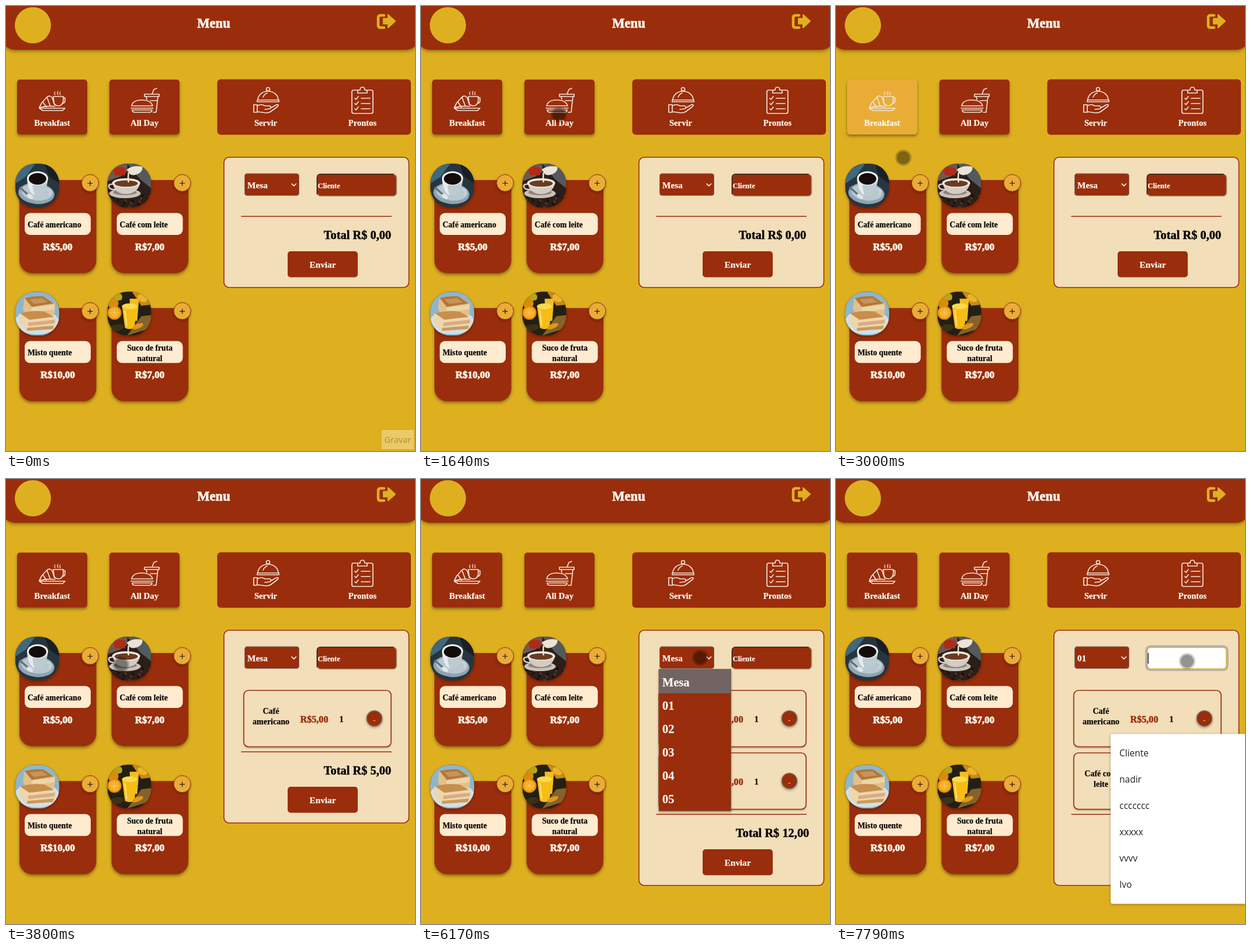
Write an HTML page with a canvas that moves like this. It is 700x762 px and loops after 7990 ms.

```html
<!DOCTYPE html>
<html lang="pt">
<head>
<meta charset="utf-8">
<title>Menu</title>
<style>
html, body { margin: 0; width: 100%; height: 100%; overflow: hidden; background: #deb020; }
canvas { display: block; }
</style>
</head>
<body>
<canvas id="stage" width="700" height="762"></canvas>
<script>
const ctx = document.getElementById('stage').getContext('2d');
const LOOP = 7990;
const GOLD = '#deb020', RED = '#9a2d0b', AMBER = '#e9ad37', CREAM = '#f2deb9', LABEL = '#ffebd0';
const SERIF = '"Liberation Serif", serif', SANS = '"Open Sans", sans-serif';

function withShadow(draw, dy = 3, blur = 5, alpha = 0.45) {
  ctx.save();
  ctx.shadowColor = `rgba(40,20,0,${alpha})`;
  ctx.shadowOffsetY = dy;
  ctx.shadowBlur = blur;
  draw();
  ctx.restore();
}

function box(x, y, w, h, r, fill, stroke, lw = 1) {
  ctx.beginPath();
  ctx.roundRect(x, y, w, h, r);
  if (fill) { ctx.fillStyle = fill; ctx.fill(); }
  if (stroke) { ctx.strokeStyle = stroke; ctx.lineWidth = lw; ctx.stroke(); }
}

function oval(x, y, rx, ry, fill, tilt = 0) {
  ctx.beginPath();
  ctx.ellipse(x, y, rx, ry, tilt, 0, Math.PI * 2);
  ctx.fillStyle = fill;
  ctx.fill();
}

const disc = (x, y, r, fill) => oval(x, y, r, r, fill);

function shape(d, fill) {
  ctx.fillStyle = fill;
  ctx.fill(new Path2D(d));
}

function line(d, color = '#f3e4d8', lw = 1.7) {
  ctx.strokeStyle = color;
  ctx.lineWidth = lw;
  ctx.lineCap = ctx.lineJoin = 'round';
  ctx.stroke(new Path2D(d));
}

// A thin outline thickens the letters
function text(str, x, y, size, color, align = 'center', heavy = 0.25) {
  ctx.font = `bold ${size}px ${SERIF}`;
  ctx.textAlign = align;
  ctx.fillStyle = ctx.strokeStyle = color;
  ctx.lineWidth = heavy;
  ctx.lineJoin = 'round';
  ctx.fillText(str, x, y);
  ctx.strokeText(str, x, y);
}

function plain(str, x, y, size, color, align) {
  ctx.font = `${size}px ${SANS}`;
  ctx.textAlign = align;
  ctx.fillStyle = color;
  ctx.fillText(str, x, y);
}

// Pictures: each fills a 75 x 75 square
const photos = {
  coffee() {
    box(0, 0, 75, 75, 0, '#26353e');
    shape('M0 0H34L18 22L0 34Z', '#41687d');
    shape('M50 0H75V34L58 22Z', '#182026');
    oval(36, 51, 31, 18, '#8fa4b0', 0.1);
    oval(37, 49, 27, 14, '#b9c7ce', 0.1);
    line('M8 41L24 55', '#5d7080', 3);
    oval(25, 56, 6, 3.5, '#dfe6e9', 0.6);
    shape('M20 25Q22 54 37 55Q53 54 56 25Z', '#bccad1');
    shape('M20 25Q22 50 33 54Q28 40 30 28Z', '#e4ebee');
    oval(38, 25, 18, 12, '#eef2f2');
    oval(38, 26, 15, 10, '#140c0a');
    line('M55 44Q64 46 58 53', '#c8d3d8', 3);
  },
  latte() {
    box(0, 0, 75, 75, 0, '#2c1e19');
    shape('M34 0H75V42L56 27Z', '#535a5e');
    shape('M0 0H34V14L22 22L0 30Z', '#6d5a52');
    shape('M10 10Q18 2 32 8L30 20H13Z', '#b02a17');
    for (let i = 0; i < 26; i++) oval(i * 29 % 75, 50 + i * 17 % 25, 3, 2, i % 2 ? '#1a100d' : '#4b3124', i);
    oval(30, 51, 27, 8, '#c9c2b9');
    oval(30, 49, 20, 5, '#8d847c');
    line('M9 35Q0 35 3 41Q6 45 13 44', '#d5cec6', 2.5);
    shape('M9 33Q12 52 32 52Q52 51 56 33Z', '#d3ccc3');
    oval(32, 33, 24, 8, '#f0ebe2');
    oval(32, 34, 20, 5.5, '#6b3b21');
    shape('M33 10Q43 2 60 5Q61 15 48 19Q40 21 37 16Z', '#ebe3d6');
    line('M36 16Q35 24 36 31', '#f6e6c8', 2.5);
  },
  toast() {
    box(0, 0, 75, 75, 0, '#8db6cb');
    oval(37, 52, 38, 21, '#cfe0e8');
    shape('M15 12Q30 6 48 8L68 20L67 40L22 43L13 30Z', '#e3c08a');
    shape('M16 11Q32 6 48 8L66 20L28 26Z', '#b27838');
    shape('M24 13L46 11L55 18L32 21Z', '#c8945a');
    shape('M28 27L67 22V30L28 35Z', '#ecd5a8');
    shape('M6 38Q26 30 50 34L70 47L66 64L20 67L7 55Z', '#ecd6ae');
    shape('M8 37Q28 31 50 34L66 43L24 48Z', '#c78e4c');
    shape('M22 53L68 48L67 54L22 59Z', '#ddab80');
    shape('M20 62L66 58L64 64L20 67Z', '#cb9a5c');
  },
  juice() {
    box(0, 0, 75, 75, 0, '#241f14');
    shape('M10 0Q30 2 24 14L8 18Z', '#b9a51c');
    shape('M42 0H75V22L58 24Z', '#c98a17');
    oval(60, 11, 9, 6, '#edb32b', 0.5);
    shape('M34 75L58 42L75 40V62Z', '#86622a');
    disc(10, 20, 9, '#d98b0c');
    disc(12, 36, 12, '#e58d0b');
    disc(12, 36, 9.5, '#f5ad25');
    line('M12 28V44M4 36H20M7 31L17 41M17 31L7 41', '#fbc95c', 1);
    shape('M38 12H54L51 50H40Z', '#f2bd1d');
    shape('M25 25H51L46 62Q38 66 30 62Z', '#f6bd14');
    oval(38, 25, 13, 5, '#fbd94f');
    line('M30 32L33 58', '#fde38a', 2);
    oval(15, 62, 13, 6, '#3a3216', -0.2);
    oval(52, 59, 10, 4, '#dc9a1a', -0.4);
  },
  burger() {
    box(0, 0, 75, 75, 0, '#f8f3e9');
    const one = (x, y, w) => {
      shape(`M${x - w} ${y - 13}Q${x - w} ${y - 36} ${x} ${y - 36}Q${x + w} ${y - 36} ${x + w} ${y - 13}Z`, '#d18a3c');
      oval(x - 3, y - 26, w * 0.6, 6, '#e9bb78', -0.2);
      oval(x, y - 11, w, 5, '#87a02a', 0.1);
      oval(x + 3, y - 6, w - 3, 4, '#b83a20');
      oval(x, y + 3, w, 9, '#5f321f');
      shape(`M${x - 4} ${y - 8}H${x + w - 2}L${x + 7} ${y + 8}Z`, '#efb526');
      oval(x - 2, y + 13, w - 2, 6, '#7d4a2b');
      oval(x - 3, y + 18, w - 2, 4, '#8ea335');
      box(x - w + 2, y + 20, 2 * w - 4, 14, [2, 2, 10, 10], '#dda45a');
    };
    one(57, 36, 18);
    one(17, 38, 24);
    oval(38, 61, 7, 11, '#6f9421', -0.3);
  }
};

const icons = {
  breakfast() {
    line('M57 174L61 166L70 156Q75 152 79 157L83 169M63 164L69 173M70 156L76 172M57 174Q70 170 84 172');
    line('M81 155H98V163Q96 171 90 171Q83 171 82 165ZM98 157H101V163Q100 167 96 167M57 175H101L97 179H63Z');
    line('M84 152q-2-2 0-5M89 152q-2-3 0-6M93 152q-2-2 0-5', undefined, 1.3);
  },
  allDay() {
    line('M215 171Q217 161 232 161Q248 161 251 171ZM214 175H252M216 178H250Q250 182 245 182H221Q216 182 216 178Z');
    line('M237 151H262V155H237ZM240 155L241 160M260 155L257 182H252M250 151L253 143L258 141M247 162H258');
  },
  serve() {
    line('M431 161A17.5 15 0 0 1 466 161M430 161H467V164H430ZM440 156Q442 151 447 149');
    line('M451.5 142.5A3 3 0 1 1 445.5 142.5A3 3 0 1 1 451.5 142.5');
    line('M424 169H430V182H424ZM430 171Q437 167 443 171H451Q455 173 452 176L443 177M454 174L463 169Q468 168 465 172L453 181Q450 183 445 183L430 181');
  },
  ready() {
    line('M601 144H595Q592 144 592 147V181Q592 184 595 184H625Q628 184 628 181V147Q628 144 625 144H619');
    line('M602 149V144H606Q606 139 610 139Q614 139 614 144H618V149Z');
    line('M597 158l2 2l4-5M597 167l2 2l4-5M597 176l2 2l4-5M608 158H623M608 167H623M608 176H623');
  }
};

function header() {
  withShadow(() => box(-8, -40, 716, 115, 24, RED), 2, 6, 0.5);
  disc(46, 33, 31, GOLD);
  text('Menu', 355.5, 37, 22.6, '#fbf3ea', 'center', 0.8);
  line('M647 16H641Q637 16 637 20V33Q637 37 641 37H647', GOLD, 4.6);
  const arrow = 'M646 21.5H654V15L666 26L654 37V30.5H646Z';
  shape(arrow, GOLD);
  line(arrow, GOLD, 2);
}

function tab(x, label, icon, lit) {
  withShadow(() => box(x, 126, 120, 94, 5, lit ? AMBER : RED));
  icon();
  text(label, x + 60, 205, 14.8, '#fff8ef');
}

function tabs(s) {
  tab(19, 'Breakfast', icons.breakfast, s.lit === 1);
  tab(177, 'All Day', icons.allDay, s.lit === 2);
  box(361.5, 125.5, 331.5, 95, 6, RED);
  icons.serve();
  icons.ready();
  text('Servir', 444.5, 205, 14.7, '#fff8ef');
  text('Prontos', 610, 205, 14.6, '#fff8ef');
}

const breakfast = [
  [['Café americano'], 'R$5,00', 'coffee'],
  [['Café com leite'], 'R$7,00', 'latte'],
  [['Misto quente'], 'R$10,00', 'toast'],
  [['Suco de fruta', 'natural'], 'R$7,00', 'juice']
];
const burger = (kind, price) => [['Hambúrguer', 'simples'], price, 'burger', kind];
const allDay = [
  burger('carne', 'R$10,00'), burger('frango', 'R$10,00'), burger('vegetariano', 'R$10,00'),
  burger('carne queijo', 'R$11,00'), burger('frango queijo', 'R$11,00'), burger('vegetariano queijo', 'R$11,00')
];

function product([name, price, photo, kind], i) {
  ctx.save();
  ctx.translate(i % 2 * 157.6, Math.floor(i / 2) * 219.3);
  withShadow(() => box(23, 298, 131.5, 159.5, [0, 0, 22, 22], RED));
  withShadow(() => box(16, 270, 75, 75, 34, RED), 2, 4);
  ctx.save();
  ctx.beginPath();
  ctx.roundRect(16, 270, 75, 75, 34);
  ctx.clip();
  ctx.translate(16, 270);
  photos[photo]();
  ctx.restore();
  withShadow(() => disc(144, 303, 14.5, AMBER), 2, 4);
  box(129.5, 288.5, 29, 29, 14.5, null, RED, 1);
  line('M140 303.5H148M144 299.5V307.5', '#2a1a08', 1.2);
  box(32, 354.5, 113, 37.5, 9, LABEL);
  if (name.length === 1) text(name[0], 37, 379, 13.6, '#0c0806', 'left');
  else name.forEach((row, k) => text(row, 88.5, 370.5 + k * 18, 13.6, '#0c0806'));
  if (kind) text(kind, 88.5, 411, 14, '#e0aa20', 'center', 0.5);
  text(price, 88.5, kind ? 436 : 418, 17, '#fff6ea', 'center', 0.8);
  ctx.restore();
}

function cartItem(name, price, i) {
  const y = i * 107;
  withShadow(() => box(407, 362 + y, 252, 96.5, 8, CREAM), 2, 3, 0.35);
  box(407, 362 + y, 252, 96.5, 8, null, RED, 1.6);
  name.forEach((row, k) => text(row, 453.5, 402 + y + k * 18, 14, '#0c0806'));
  text(price, 527.5, 417 + y, 16.2, RED, 'center', 0.5);
  text('1', 574, 416 + y, 14.5, '#0c0806');
  withShadow(() => disc(630.5, 410 + y, 13.5, RED), 2, 4);
  box(617.5, 397 + y, 26, 26, 13, null, '#756a62', 1.4);
  text('-', 630.5, 417 + y, 13, AMBER);
}

function field(focus) {
  if (focus) {
    box(531, 286.5, 139, 40.5, 7, '#fff', '#b3b0ad', 3.5);
    box(533, 288.5, 135, 36.5, 5, '#fff', '#e0b32c', 1.5);
    box(533.5, 298, 1.5, 18, 0, '#222');
    return;
  }
  box(532.5, 288, 136, 37.5, 6, RED, '#a8937c', 1.6);
  line('M532.5 322V294Q532.5 288 538.5 288H663', '#2e1208', 1.6);
  text('Cliente', 533.5, 312, 12.5, '#fff8ef', 'left');
}

function cart(s) {
  const y = s.items * 107;
  box(373, 259, 316.5, 223 + y, 9, CREAM, RED, 1.6);
  box(408.5, 287, 93, 37.5, 4, RED, '#80736b', 1);
  text(s.table, 413, 312, 15.3, '#fff8ef', 'left');
  line('M489 304.5L492.7 308.2L496.4 304.5', '#fff8ef', 1.7);
  field(s.focus);
  if (s.items > 0) cartItem(['Café', 'americano'], 'R$5,00', 0);
  if (s.items > 1) cartItem(['Café com', 'leite'], 'R$7,00', 1);
  box(402.5, 359.5 + y, 257.5, 1.6, 0, RED);
  text('Total R$ ' + ['0,00', '5,00', '12,00'][s.items], 601.5, 399 + y, 20.4, '#0c0806', 'center', 0.5);
  box(482, 420 + y, 120, 44.5, 5, RED);
  text('Enviar', 542, 448 + y, 15.3, '#fff8ef');
}

function tableList(hover) {
  withShadow(() => box(407, 325.5, 124, 243.5, 0, RED), 2, 4, 0.3);
  box(407.5, 326 + hover * 40.2, 123, 41, 0, '#716462');
  box(407.5, 326, 123, 242.5, 0, null, '#75655d', 1);
  ['Mesa', '01', '02', '03', '04', '05'].forEach((row, i) =>
    text(row, 413, 355 + i * 40, 20.4, '#fff8ef', 'left'));
}

function clientList() {
  withShadow(() => box(470, 436.5, 240, 291, 4, '#fff'), 1, 4, 0.4);
  ['Cliente', 'nadir', 'ccccccc', 'xxxxx', 'vvvv', 'Ivo'].forEach((row, i) =>
    plain(row, 485, 475 + i * 45, 15.5, '#222', 'left'));
}

// Pointer stops: time, x, y
const path = [
  [390, 519, 733], [1150, 275, 232], [1500, 236, 186], [1900, 236, 186], [2380, 67, 187],
  [2720, 67, 187], [3200, 144, 303], [3650, 144, 303], [3800, 197, 318], [4410, 311, 309],
  [4870, 311, 309], [4970, 301, 303], [5120, 301, 303], [5620, 478, 306], [6170, 478, 306],
  [6500, 436, 388], [6720, 436, 388], [6910, 509, 363], [7120, 601, 312]
];
const presses = [[1700, 1850], [2400, 2590], [3330, 3480], [4940, 5140], [5690, 5820], [6570, 6700], [7520, 7660]];

function pointerAt(t) {
  const i = path.findIndex(p => p[0] > t);
  if (i < 0) return path[path.length - 1].slice(1);
  if (i === 0) return path[0].slice(1);
  const [t0, x0, y0] = path[i - 1], [t1, x1, y1] = path[i];
  const u = (t - t0) / (t1 - t0), k = u * u * (3 - 2 * u);
  return [x0 + (x1 - x0) * k, y0 + (y1 - y0) * k];
}

function pointer(t) {
  if (t < path[0][0]) return;
  const [x, y] = pointerAt(t);
  if (presses.some(([a, b]) => t >= a && t < b)) {
    disc(x, y, 15, 'rgba(175,185,0,.6)');
    disc(x, y, 11, 'rgba(160,160,0,.4)');
  } else {
    disc(x, y, 14, 'rgba(0,0,0,.2)');
    disc(x, y, 11, 'rgba(0,0,0,.28)');
  }
}

function stateAt(t) {
  return {
    burgers: t >= 1830 && t < 2590,
    lit: t >= 1830 && t < 2590 ? 2 : t >= 2590 && t < 3400 ? 1 : 0,
    items: t < 3470 ? 0 : t < 5140 ? 1 : 2,
    table: t < 6700 ? 'Mesa' : '01',
    open: t >= 5820 && t < 6700,
    focus: t >= 7590,
    clients: t >= 7720
  };
}

function draw(t) {
  const s = stateAt(t);
  box(0, 0, 700, 762, 0, GOLD);
  header();
  tabs(s);
  (s.burgers ? allDay : breakfast).forEach(product);
  cart(s);
  if (s.open) tableList(pointerAt(t)[1] > 367 ? 1 : 0);
  if (s.clients) clientList();
  if (t < 70) {
    box(642.5, 725.5, 56, 34, 0, '#e9ca68', '#d9a73c', 1);
    plain('Gravar', 670.5, 748, 14.6, '#b88a2c', 'center');
  }
  pointer(t);
}

const start = performance.now();
function tick() {
  draw((performance.now() - start) % LOOP);
  requestAnimationFrame(tick);
}
tick();
</script>
</body>
</html>
```
